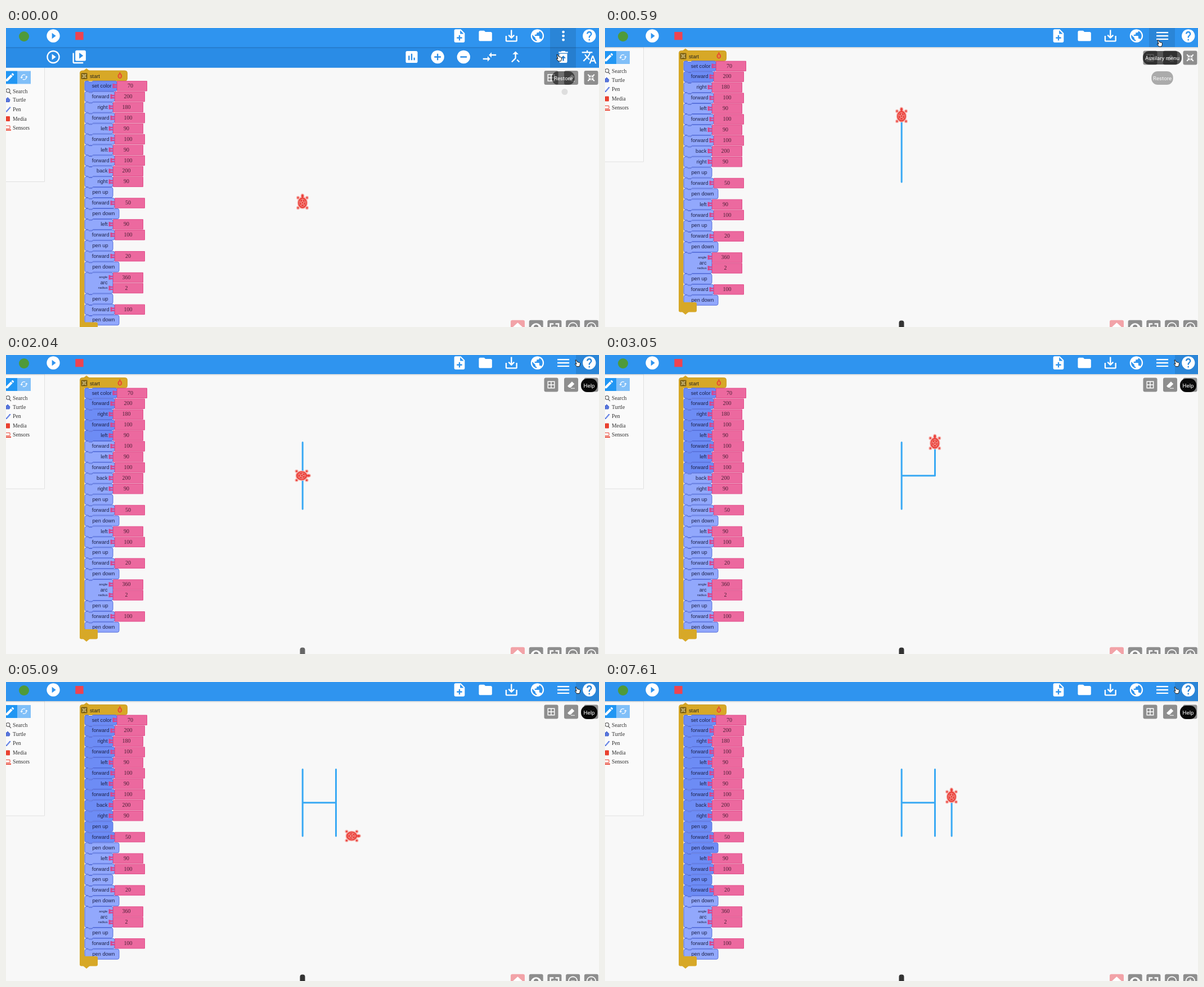
Recreate the animation shown at these times as an HTML page with a canvas. Size 1054 px wide and 532 px high, loop 8000 ms.

```html
<!DOCTYPE html>
<html lang="en">
<head>
<meta charset="utf-8">
<title>Turtle program</title>
<style>
  html, body { margin: 0; width: 100%; height: 100%; overflow: hidden; background: #f8f8f8; }
  canvas { display: block; }
</style>
</head>
<body>
<canvas id="stage" width="1054" height="532"></canvas>
<script>
const c = document.getElementById('stage').getContext('2d');
const LOOP = 8000, MENU_CLOSE = 520, MENU_HEIGHT = 35.5, UNIT = 0.593;
const SANS = '"Liberation Sans", Arial, sans-serif';
const SERIF = '"Liberation Serif", Times, serif';
const UI = 'Roboto, sans-serif';

const disc = 'M12 2a10 10 0 1 0 .01 0z';
const icons = {
  play: disc + 'M10 16.5v-9l6 4.5z',
  newFile: 'M14 2H6c-1.1 0-2 .9-2 2v16c0 1.1.9 2 2 2h12c1.1 0 2-.9 2-2V8zm2 14h-3v3h-2v-3H8v-2h3v-3h2v3h3zm-3-7V3.5L18.5 9z',
  folder: 'M10 4H4c-1.1 0-2 .9-2 2v12c0 1.1.9 2 2 2h16c1.1 0 2-.9 2-2V8c0-1.1-.9-2-2-2h-8z',
  save: 'M19 12v7H5v-7H3v7c0 1.1.9 2 2 2h14c1.1 0 2-.9 2-2v-7zm-6 .67l2.59-2.58L17 11.5l-5 5-5-5 1.41-1.41L11 12.67V3h2z',
  globe: disc + 'M11 19.93c-3.95-.49-7-3.85-7-7.93 0-.62.08-1.21.21-1.79L9 15v1c0 1.1.9 2 2 2zm6.9-2.54c-.26-.81-1-1.39-1.9-1.39h-1v-3c0-.55-.45-1-1-1H8v-2h2c.55 0 1-.45 1-1V7h2c1.1 0 2-.9 2-2v-.41c2.93 1.19 5 4.06 5 7.41 0 2.08-.8 3.97-2.1 5.39z',
  dots: 'M12 4a2 2 0 1 0 .01 0zM12 10a2 2 0 1 0 .01 0zM12 16a2 2 0 1 0 .01 0z',
  menu: 'M3 18h18v-2H3zM3 13h18v-2H3zM3 6v2h18V6z',
  help: disc + 'M13 19h-2v-2h2zm2.07-7.75l-.9.92C13.45 12.9 13 13.5 13 15h-2v-.5c0-1.1.45-2.1 1.17-2.83l1.24-1.26c.37-.36.59-.86.59-1.41 0-1.1-.9-2-2-2s-2 .9-2 2H8c0-2.21 1.79-4 4-4s4 1.79 4 4c0 .88-.36 1.68-.93 2.25z',
  playRing: disc + 'M12 4a8 8 0 1 0 .01 0zM10 16.5l6-4.5-6-4.5z',
  playStack: 'M4 6H2v14c0 1.1.9 2 2 2h14v-2H4zM20 2H8c-1.1 0-2 .9-2 2v12c0 1.1.9 2 2 2h12c1.1 0 2-.9 2-2V4c0-1.1-.9-2-2-2zm-8 12.5v-9l6 4.5z',
  chart: 'M19 3H5c-1.1 0-2 .9-2 2v14c0 1.1.9 2 2 2h14c1.1 0 2-.9 2-2V5c0-1.1-.9-2-2-2zM9 17H7v-7h2zm4 0h-2V7h2zm4 0h-2v-4h2z',
  plus: disc + 'M17 13h-4v4h-2v-4H7v-2h4V7h2v4h4z',
  minus: disc + 'M17 13H7v-2h10z',
  arrows: 'M9 14H2v2h7v3l4-4-4-4zM15 13v-3h7V8h-7V5l-4 4z',
  merge: 'M17 20.41L18.41 19 15 15.59 13.59 17zM7.5 8H11v5.59L5.59 19 7 20.41l6-6V8h3.5L12 3.5z',
  trash: 'M6 19c0 1.1.9 2 2 2h8c1.1 0 2-.9 2-2V7H6zM12 10l4 4h-3v4h-2v-4H8zM15.5 4l-1-1h-5l-1 1H5v2h14V4z',
  translate: 'M12.87 15.07l-2.54-2.51c1.74-1.94 3.01-4.2 3.74-6.56H17V4h-7V2H8v2H1v2h11.17C11.5 7.92 10.44 9.75 9 11.35 8.07 10.32 7.3 9.19 6.69 8h-2c.73 1.63 1.73 3.17 2.98 4.56l-5.09 5.02L4 19l5-5 3.11 3.11zM18.5 10h-2L12 22h2l1.12-3h4.75L21 22h2zm-2.62 7l1.62-4.33L19.12 17z',
  refresh: 'M19 8l-4 4h3c0 3.31-2.69 6-6 6-1 0-1.97-.25-2.8-.7l-1.46 1.46C8.97 19.54 10.43 20 12 20c4.42 0 8-3.58 8-8h3zM6 12c0-3.31 2.69-6 6-6 1 0 1.97.25 2.8.7l1.46-1.46C15.03 4.46 13.57 4 12 4c-4.42 0-8 3.58-8 8H1l4 4 4-4z',
  pencil: 'M3 17.2V21h3.8L17.8 9.9l-3.7-3.7zM20.7 7c.4-.4.4-1 0-1.4l-2.3-2.3c-.4-.4-1-.4-1.4 0l-1.8 1.8 3.7 3.7z',
  grid: 'M3 3h18v18H3zM5 5v6h6V5zM13 5v6h6V5zM5 13v6h6v-6zM13 13v6h6v-6z',
  eraser: 'M3 15L14 4l6 6-9 9H7zM11 20h10v1.5H11z',
  inward: ['M11 11V5L9 7 5 3 3 5l4 4-2 2z', 'M13 11V5l2 2 4-4 2 2-4 4 2 2z',
           'M11 13v6l-2-2-4 4-2-2 4-4-2-2z', 'M13 13v6l2-2 4 4 2-2-4-4 2-2z'].join(''),
  home: 'M10 20v-6h4v6h5v-8h3L12 3 2 12h3v8z',
  eye: 'M12 4C7 4 2.7 7.6 1 12c1.7 4.4 6 8 11 8s9.3-3.6 11-8c-1.7-4.4-6-8-11-8zM12 7a5 5 0 1 0 .01 0z',
  unfold: 'M2 4h8v3H5v5H2zM14 4h8v8h-3V7h-5zM8 11h8v8H8z',
  zoomOut: disc + 'M12 4a8 8 0 1 0 .01 0zM8 11h8v2H8z',
  zoomIn: disc + 'M12 4a8 8 0 1 0 .01 0zM8 11h3V8h2v3h3v2h-3v3h-2v-3H8z'
};
for (const name in icons) icons[name] = new Path2D(icons[name]);

// Each entry: label, argument, time at which it runs
const program = [
  ['set color', 70, 0], ['forward', 200, 90], ['right', 180, 610], ['forward', 100, 1120],
  ['left', 90, 1630], ['forward', 100, 2130], ['left', 90, 2570], ['forward', 100, 3050],
  ['back', 200, 3590], ['right', 90, 4070], ['pen up', , 5090], ['forward', 50, 5090],
  ['pen down', , 6110], ['left', 90, 6110], ['forward', 100, 6590], ['pen up', , 7610],
  ['forward', 20, 7610], ['pen down'], ['arc', 360], ['pen up'], ['forward', 100], ['pen down']
];
const blockWidth = { 'set color': 57, forward: 53, 'pen down': 61 };

function track(t, keys) {
  if (t <= keys[0][0]) return keys[0][1];
  for (let i = 1; i < keys.length; i++) {
    const [t0, v0] = keys[i - 1], [t1, v1] = keys[i];
    if (t < t1) return v0 + (v1 - v0) * (t - t0) / (t1 - t0);
  }
  return keys[keys.length - 1][1];
}

function rect(x, y, w, h, fill, r = 0, stroke) {
  c.beginPath();
  c.roundRect(x, y, w, h, r);
  paint(fill, stroke);
}

function paint(fill, stroke, width = 1) {
  if (fill) { c.fillStyle = fill; c.fill(); }
  if (stroke) { c.strokeStyle = stroke; c.lineWidth = width; c.stroke(); }
}

function text(s, x, y, font, fill, align = 'left') {
  c.font = font;
  c.fillStyle = fill;
  c.textAlign = align;
  c.fillText(s, x, y);
}

function icon(name, x, y, scale = 1.17, fill = '#fff') {
  c.save();
  c.translate(x, y);
  c.scale(scale, scale);
  c.translate(-12, -12);
  c.fillStyle = fill;
  c.fill(icons[name], 'evenodd');
  c.restore();
}

function polygon(points, fill, stroke, width) {
  c.beginPath();
  points.forEach(p => c.lineTo(...p));
  c.closePath();
  paint(fill, stroke, width);
}

function blockBody(y, w, h, fill) {
  const x = 140, r = 3;
  c.beginPath();
  c.moveTo(x + r, y);
  [[6, 0], [7.5, 1.7], [13, 1.7], [14.5, 0]].forEach(([dx, dy]) => c.lineTo(x + dx, y + dy));
  c.arcTo(x + w, y, x + w, y + h, r);
  c.arcTo(x + w, y + h, x, y + h, r);
  [[14.5, 0], [13, 1.7], [7.5, 1.7], [6, 0]].forEach(([dx, dy]) => c.lineTo(x + dx, y + h + dy));
  c.arcTo(x, y + h, x, y, r);
  c.arcTo(x, y, x + r, y, r);
  paint(fill, '#556fdc');
}

function argument(value, x, y) {
  rect(x - 7.5, y - 4, 3, 8, '#d5458f');
  rect(x - 5, y - 3, 5, 2.5, '#d5458f');
  rect(x - 5, y + 1, 5, 2.5, '#d5458f');
  rect(x + .5, y - 8.4, 53, 17.4, '#ec699f', 0, '#e24c8a');
  text(value, x + 24, y + 3, '10px ' + SERIF, '#4a2036', 'center');
}

function drawBlocks(t) {
  const gold = '#d7a827', edge = '#c99d20';
  polygon([[137, 41], [143, 36.5], [149, 41]], gold);
  rect(131.5, 40.5, 84, 18, gold, 4, edge);
  rect(131, 46, 8.5, 455, gold);
  rect(133.5, 44.5, 11, 11, '#7b6014', 1);
  icon('inward', 139, 50, .42, '#f1df9f');
  text('start', 149, 53.5, '9.2px ' + SANS, '#222');
  rect(201.2, 43.5, 2.4, 1.6, '#e83b30');
  c.beginPath();
  c.ellipse(202.4, 50, 3, 3.7, 0, 0, 7);
  paint('#e88a35', '#e83b30', 1.5);

  let row = 0;
  for (const [label, value, time] of program) {
    const y = 67.5 + 18.93 * row, w = blockWidth[label] || 50;
    const arc = label === 'arc', right = 140 + w;
    blockBody(y - 8.7, w, arc ? 37 : 18, time <= t ? '#6d8cf5' : '#92a8fc');
    const pen = label.startsWith('pen');
    text(label, pen ? 153.5 : right - 9.5, arc ? y + 12.5 : y + 3,
      '9.2px ' + SANS, '#1b2048', pen ? 'left' : 'right');
    if (value) argument(value, right, y);
    if (arc) {
      text('angle', 180.5, y + 1.5, '6.2px ' + SANS, '#1b2048', 'right');
      text('radius', 180.5, y + 20.5, '6.2px ' + SANS, '#1b2048', 'right');
      argument(2, right, y + 18.93);
    }
    row += arc ? 2 : 1;
  }
  rect(131, 488, 32, 17.5, gold, 3);
  rect(131, 486, 9, 8, gold);
  polygon([[137, 505], [149, 505], [143, 510]], gold);
}

function drawTurtle(t) {
  let x = 527.2, y = 274, angle = 0, pen = true;
  c.beginPath();
  c.moveTo(x, y);
  for (const [label, value, time] of program) {
    if (!(time <= t)) break;
    const turn = { left: -1, right: 1 }[label], move = { forward: 1, back: -1 }[label];
    if (turn) angle += turn * value * Math.PI / 180;
    if (label.startsWith('pen')) pen = label === 'pen down';
    if (move) {
      x += Math.sin(angle) * value * move * UNIT;
      y -= Math.cos(angle) * value * move * UNIT;
      pen ? c.lineTo(x, y) : c.moveTo(x, y);
    }
  }
  c.lineCap = c.lineJoin = 'round';
  paint(null, '#39a9f4', 3);

  c.save();
  c.translate(x - .2, y);
  c.rotate(angle);
  const shape = new Path2D();
  const blob = (dx, dy, rx, ry) => {
    shape.moveTo(dx + rx, dy);
    shape.ellipse(dx, dy, rx, ry, 0, 0, Math.PI * 2);
  };
  blob(0, 1.5, 7.8, 9.5);
  blob(0, -10.5, 1.9, 3);
  for (const sx of [-1, 1]) for (const sy of [-1, 1]) blob(sx * 8, sy * 9 + 1.5, 1.5, 1.7);
  c.strokeStyle = '#f6b1ac';
  c.lineWidth = 3;
  c.stroke(shape);
  c.fillStyle = '#ea403a';
  c.fill(shape);
  const star = (rx, ry, i) => [Math.sin(i * 1.2566) * rx, 1.5 - Math.cos(i * 1.2566) * ry];
  c.beginPath();
  c.ellipse(0, 1.5, 5.4, 6.6, 0, 0, 7);
  paint(null, '#f5a29b', .8);
  polygon([0, 1, 2, 3, 4].map(i => star(2.3, 2.8, i)), null, '#f8c4bd', .8);
  for (let i = 0; i < 5; i++) polygon([star(2.5, 3, i), star(5, 6.2, i)], null, '#f5a29b', .7);
  c.restore();
  c.lineCap = 'butt';
  c.lineJoin = 'miter';
}

function drawPalette() {
  rect(-2, 34, 70.5, 204, '#fafafa', 0, '#e0e0e0');
  rect(0, 41, 20, 23, '#2196f3');
  rect(20, 41, 24, 23, '#80bff8');
  icon('pencil', 7, 52, .8);
  icon('refresh', 32, 52, .62);
  ['Search', 'Turtle', 'Pen', 'Media', 'Sensors'].forEach((name, i) =>
    text(name, 12, [80, 95.5, 112, 129, 145][i], '9.7px ' + SERIF, '#333'));
  c.beginPath();
  c.arc(3.5, 76, 3.3, 0, 7);
  c.moveTo(6, 79);
  c.lineTo(9, 82);
  paint(null, '#666', 1.3);
  polygon([[0, 91], [3, 88], [7, 92], [6, 96], [0, 96]], '#5876dd', '#4764cc');
  polygon([[0, 113], [7, 105], [8, 106], [1, 114]], '#7d9af5', '#5876dd');
  rect(0, 121.5, 7, 9, '#e9412f', 1);
  rect(-1, 138.5, 8, 5, '#fff', 0, '#e9412f');
  rect(0, 145, 9, 2, '#e9412f');
}

function drawButtons(offset) {
  ['grid', 'eraser', 'inward'].forEach((name, i) => {
    const x = [969, 1004.5, 1040][i];
    rect(x - 12.5, 40.5 + offset, 25, 25, '#8e8e8e', 3);
    icon(name, x, 53 + offset, .72);
  });
  ['home', 'eye', 'unfold', 'zoomOut', 'zoomIn'].forEach((name, i) => {
    const x = 909.5 + i * 32.7;
    rect(x - 12.5, 519.8, 25, 25, i ? '#8e8e8e' : '#f2a3a8', 3);
    icon(name, x, 532, .85);
  });
}

function drawToolbar(t, open, pointer) {
  const dim = 'rgba(0,0,0,.1)';
  if (open) {
    rect(0, 34, 1054, 36.8, '#2a8ce6');
    if (pointer.y > 34) rect(967, 34, 46, 36.8, dim);
  }
  const shade = c.createLinearGradient(0, 34, 0, 37);
  shade.addColorStop(0, 'rgba(0,0,0,.14)');
  shade.addColorStop(1, 'rgba(0,0,0,0)');
  rect(0, 34, 1054, 3, shade);
  rect(0, 0, 1054, 34, '#2f94ef');
  if (t < 1000) rect(967, 0, 46, 34, dim);
  if (pointer.x > 1013 && pointer.y < 34) rect(1013, 0, 41, 34, dim);

  c.beginPath();
  c.arc(32, 15, 9, 0, 7);
  paint('#4f9a3a');
  icon('play', 84, 14);
  rect(123.3, 7, 14.3, 14.2, '#ee4350');
  ['newFile', 'folder', 'save', 'globe', open ? 'dots' : 'menu', 'help'].forEach((name, i) =>
    icon(name, 806 + i * 46.15, 14));
  if (!open) return;
  icon('playRing', 84, 51.5);
  icon('playStack', 130.2, 51.5);
  ['chart', 'plus', 'minus', 'arrows', 'merge'].forEach((name, i) =>
    icon(name, 721 + i * 46.15, 51.5));
  icon('trash', 990.5, 51.5);
  icon('translate', 1036.5, 51.5);
}

function tooltip(label, x, y, w, alpha) {
  if (alpha <= 0) return;
  rect(x - w / 2, y - 12, w, 24, `rgba(0,0,0,${alpha})`, 11);
  text(label, x, y + 3.5, '9.7px ' + UI, `rgba(255,255,255,${Math.min(1, alpha * 3)})`, 'center');
}

function drawTooltips(t) {
  const restore = track(t, [[0, .55], [120, .75], [400, .75], [590, .31], [760, 0]]);
  tooltip('Restore', 990.5, 89, 36 + 8 * Math.min(1, restore), restore);
  if (t < 90) {
    c.beginPath();
    c.arc(993, 113.5, 5.5, 0, 7);
    paint('#dedede');
  }
  tooltip('Auxilary menu', 990.5, 53, 69, track(t, [[480, 0], [590, .65], [700, .74], [1300, .74], [1460, 0]]));
  tooltip('Help', 1036.5, 54, 29, track(t, [[1700, 0], [1900, .94]]));
  const clean = track(t, [[1060, 0], [1120, 1], [1380, 1], [1500, 0]]);
  if (clean > 0) text('Clean', 1008, 80, '8.2px ' + UI, `rgba(20,20,20,${clean})`, 'center');
}

function drawPointer({ x, y }, open) {
  c.save();
  c.translate(x, y);
  if (y > (open ? 71 : 34)) {
    polygon([[-1, -7], [-1, 4], [1.5, 2], [3.5, 6], [5.2, 5.2], [3.4, 1.3], [6.5, 1]], '#111', '#fff', 1);
  } else {
    polygon([[-4, -5.5], [-2.5, -5.5], [-.5, -2], [3.5, -1], [4.5, 0], [4.2, 3.5],
             [3, 6], [-1.5, 6], [-4.5, 2], [-4, .8], [-2, 2]], '#fff', '#111', 1);
  }
  c.restore();
}

function frame(now) {
  const t = now % LOOP, open = t < MENU_CLOSE, offset = open ? MENU_HEIGHT : 0;
  const pointer = {
    x: track(t, [[0, 983], [90, 983], [420, 986], [880, 986], [1120, 992], [1330, 992], [1960, 1016]]),
    y: track(t, [[0, 53], [90, 53], [420, 27], [880, 27], [1120, 61], [1330, 61], [1960, 14.5]])
  };
  rect(0, 0, 1054, 532, '#f8f8f8');
  c.save();
  c.translate(0, offset);
  rect(522.5, 520.5, 9, 20, t >= 1270 && t < 2130 ? '#666' : '#333', 4);
  drawPalette();
  drawBlocks(t);
  drawTurtle(t);
  c.restore();
  drawButtons(offset);
  drawToolbar(t, open, pointer);
  drawTooltips(t);
  drawPointer(pointer, open);
  requestAnimationFrame(frame);
}
requestAnimationFrame(frame);
</script>
</body>
</html>
```
